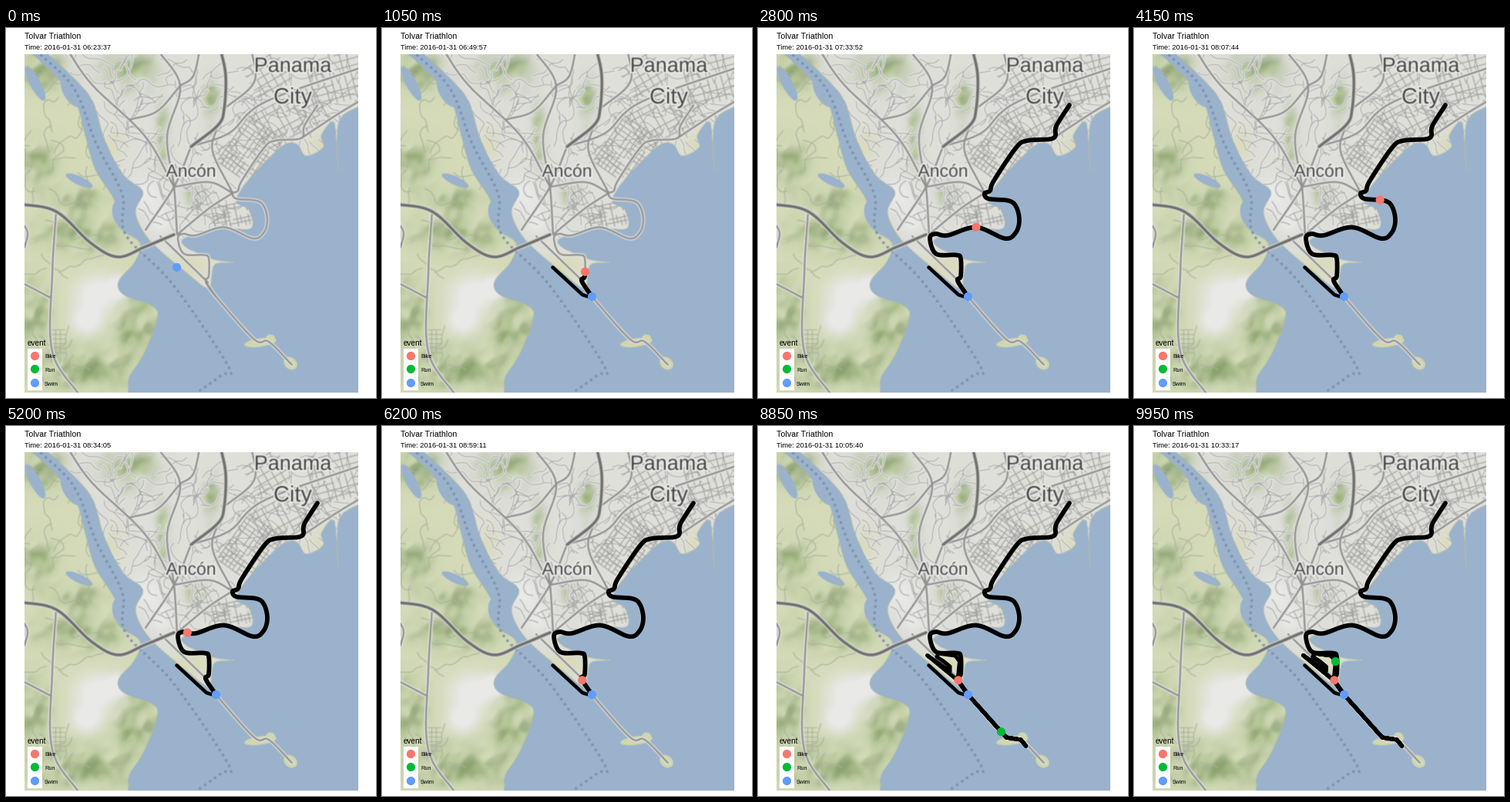
Recreate the animation shown at these times as a matplotlib script. Size 480x480 px, loop 10 s.

```python
import math
import random

import matplotlib.pyplot as plt
import numpy as np
from matplotlib.animation import FuncAnimation
from matplotlib.collections import LineCollection
from matplotlib.patches import Circle, Ellipse, Polygon, Rectangle
from matplotlib.patheffects import withStroke

SIZE, DPI = 480, 72
FRAMES, INTERVAL = 200, 50
LEFT, RIGHT, TOP, BOTTOM = 24, 457, 34, 473
START = 6 * 3600 + 23 * 60 + 37
DURATION = 14980
WATER = "#9ab2cc"
BIKE, RUN, SWIM = "#f8766d", "#00ba38", "#619cff"

random.seed(31)
rng = np.random.default_rng(31)
plt.rcParams["font.family"] = "Liberation Sans"

fig = plt.figure(figsize=(SIZE / DPI, SIZE / DPI), dpi=DPI, facecolor="white")
ax = fig.add_axes([0, 0, 1, 1])


def reset_axes():
    ax.clear()
    ax.set_xlim(0, SIZE)
    ax.set_ylim(SIZE, 0)
    ax.axis("off")


def smooth(pts, n=8):
    """Catmull-Rom curve through the points."""
    p = np.array(pts, float)
    p = np.vstack([2 * p[0] - p[1], p, 2 * p[-1] - p[-2]])
    t = np.linspace(0, 1, n, endpoint=False)[:, None]
    out = []
    for a, b, c, d in zip(p, p[1:], p[2:], p[3:]):
        out.append(0.5 * (2 * b + (c - a) * t + (2 * a - 5 * b + 4 * c - d) * t**2
                          + (3 * b - a - 3 * c + d) * t**3))
    return np.vstack(out + [p[-2:-1]])


class Route:
    def __init__(self, pts):
        self.pts = np.array(pts, float)
        steps = np.hypot(*np.diff(self.pts, axis=0).T)
        self.dist = np.concatenate([[0], np.cumsum(steps)])
        self.length = self.dist[-1]

    def at(self, s):
        return [np.interp(s, self.dist, self.pts[:, k]) for k in (0, 1)]

    def until(self, s):
        return np.vstack([self.pts[self.dist < s], self.at(s)])

    def near(self, x, y):
        return self.dist[np.argmin(np.hypot(*(self.pts - [x, y]).T))]


# ---- routes ----
swim = Route([(221.5, 310.5), (260, 346), (266, 348), (272.5, 348.5)])
bike = Route(smooth([
    (272, 348), (259, 328), (263, 322), (263, 299), (257, 294.5), (231, 293),
    (223, 273), (230, 267), (246, 269), (283, 258.5), (320, 273),
    (334, 266), (339, 250), (335, 232), (325, 224), (299, 221.5), (294, 214.5), (301, 211),
    (306, 198), (335, 155), (350, 146), (383, 143), (387, 127), (404, 100)]))
SPUR = [(259, 330), (272, 348), (322, 404), (341, 407), (347.5, 415)]
NORTH = [(219.5, 297.5), (249, 318), (249, 312), (241, 305.5), (232, 299.5), (234, 295),
         (256, 298), (261.5, 305.5)]
LAP = SPUR + SPUR[-2::-1] + NORTH
run = Route(LAP + LAP)
RUN_MID = Route(LAP[:-4]).length

# ---- map ----
WEST = [(16, 26), (36, 36), (71, 70), (92, 100), (103, 140), (116, 184), (141, 224),
        (146, 258), (174, 279), (166, 305), (146, 328), (152, 346), (192, 362),
        (195, 382), (178, 424), (160, 452), (144, 485), (16, 485)]
EAST = [(46, 26), (88, 65), (113, 96), (127, 142), (152, 190), (178, 212),
        (168, 240), (187, 276), (234, 317), (262, 338), (267, 320), (272, 306),
        (297, 304), (268, 300), (231, 282), (235, 271), (283, 260),
        (318, 260), (315, 236), (299, 226), (306, 208), (330, 180), (360, 152), (378, 151),
        (389, 166), (411, 155), (409, 139), (426, 123), (431, 184), (432, 120), (470, 90),
        (470, 26)]
# centre, size, angle
ISLANDS = [(330, 408, 42, 11, -8), (343, 404, 13, 13, 0), (369, 435, 19, 15, 40)]
PONDS = [(38, 72, 50, 14, 62), (85, 84, 42, 20, 58), (95, 198, 38, 11, 25),
         (148, 240, 20, 34, -10), (241, 281, 24, 14, 25)]
MOTORWAYS = [
    [(16, 228), (65, 238), (110, 279), (145, 297), (180, 284), (218, 268)],
    [(278, 26), (285, 62), (283, 105), (275, 126), (240, 154)],
]
ROADS = [
    [(78, 26), (112, 74), (180, 140), (218, 206)],
    [(195, 26), (226, 75), (209, 140), (218, 206), (222, 268)],
    [(240, 154), (218, 206), (181, 262)],
    [(226, 75), (243, 62), (252, 26)],
    [(226, 75), (196, 108), (160, 119)],
    [(240, 154), (290, 136), (336, 96), (470, 48)],
    [(283, 105), (322, 70), (318, 26)],
    [(275, 126), (268, 160), (294, 214)],
    [(218, 206), (264, 200), (294, 214)],
    [(222, 268), (262, 235), (294, 214)],
    [(383, 143), (430, 112), (470, 88)],
    [(65, 238), (60, 320), (60, 420), (98, 480)],
    [(16, 328), (58, 350)],
    [(20, 250), (28, 266), (24, 285)],
    [(200, 270), (262, 330)],
]
FERRY = [(40, 30), (88, 78), (117, 150), (151, 216), (155, 268), (216, 332), (288, 438),
         (280, 450), (246, 474)]
# centre, spread
GREENS = [(48, 55, 30, 22), (36, 178, 26, 26), (95, 224, 28, 14), (95, 268, 50, 20),
          (172, 385, 26, 38), (105, 442, 55, 26), (34, 370, 20, 38), (160, 55, 30, 24),
          (204, 140, 8, 36), (266, 92, 10, 26), (247, 218, 11, 15)]
WHITES = [(118, 345, 30, 24), (105, 380, 20, 18), (148, 335, 14, 13), (180, 216, 24, 18),
          (200, 248, 14, 16)]
SANDS = [(140, 150, 14, 24), (238, 310, 32, 18), (412, 152, 22, 20)]


def blobs(items, x, y):
    return sum(np.exp(-((x - cx) / sx)**2 - ((y - cy) / sy)**2)
               for cx, cy, sx, sy in items)


def terrain(x, y):
    out = np.zeros_like(x)
    for _ in range(40):
        wave, a, phase = rng.uniform(14, 60), rng.uniform(0, math.pi), rng.uniform(0, 6.28)
        out += wave * np.sin((x * math.cos(a) + y * math.sin(a)) * 6.283 / wave + phase)
    return out / 150


def tint(color, alpha, clip):
    rgba = np.empty(alpha.shape + (4,))
    rgba[..., :3] = np.array(color) / 255
    rgba[..., 3] = np.clip(alpha, 0, 1)
    img = ax.imshow(rgba, extent=(LEFT, RIGHT, BOTTOM, TOP), aspect="auto", zorder=2)
    img.set_clip_path(clip)


def strokes(lines, color, width, clip, z, casing=None):
    if casing:
        strokes(lines, casing, width + 2.2, clip, z - .1)
    group = ax.add_collection(LineCollection(lines, colors=color, linewidths=width, zorder=z,
                                             capstyle="round"))
    group.set_clip_path(clip)


def wander(x0, y0, x1, y1, count):
    """Random winding lanes that start inside a box."""
    lines = []
    for _ in range(count):
        x, y = random.uniform(x0, x1), random.uniform(y0, y1)
        a, pts = random.uniform(0, 6.28), []
        for _ in range(random.randint(4, 9)):
            pts.append((x, y))
            a += random.gauss(0, .5)
            x, y = x + 8 * math.cos(a), y + 8 * math.sin(a)
        lines.append(smooth(pts, 4))
    return lines


def blocks(cx, cy, w, h, angle, step):
    """Broken street grid, turned by the angle in degrees."""
    c, s = math.cos(math.radians(angle)), math.sin(math.radians(angle))
    lines = []
    for flip, (long, short) in enumerate([(w, h), (h, w)]):
        for v in np.arange(-short / 2, short / 2, step):
            u = -long / 2
            while u < long / 2:
                end = min(u + random.uniform(2, 6) * step, long / 2)
                ends = [(v, u), (v, end)] if flip else [(u, v), (end, v)]
                if random.random() < .8:
                    lines.append([(cx + p * c - q * s, cy + p * s + q * c) for p, q in ends])
                u = end + step * random.choice([0, 0, 1])
    return lines


def label(x, y, text, size):
    ax.text(x, y, text, size=size, color="#444444", ha="center", va="baseline", zorder=9,
            path_effects=[withStroke(linewidth=3.5, foreground="#efefee")])


def oval(x, y, w, h, angle, color, z):
    ax.add_patch(Ellipse((x, y), w, h, angle=angle, fc=color, ec="none", zorder=z))


def draw_map():
    panel = ax.add_patch(Rectangle((LEFT, TOP), RIGHT - LEFT, BOTTOM - TOP, fc=WATER,
                                   ec="none", zorder=0))
    west, east = [ax.add_patch(Polygon(smooth(p, 5), fc=color, ec="#b4bf9f", lw=.7, zorder=1))
                  for p, color in ((WEST, "#d5dbb9"), (EAST, "#dfdfda"))]
    for isle in ISLANDS:
        oval(*isle, "#d0d6ae", 1)
    for pond in PONDS:
        oval(*pond, WATER, 2.5)

    x, y = np.meshgrid(np.arange(LEFT, RIGHT) + .5, np.arange(TOP, BOTTOM) + .5)
    height = terrain(x, y)
    gy, gx = np.gradient(height)
    shade = (gx + gy) * 1.2
    green = np.clip(blobs(GREENS, x, y), 0, 1)
    for clip in (west, east):
        tint((217, 218, 176), blobs(SANDS, x, y) * .8, clip)
        tint((164, 185, 134), green * (.85 + .25 * height), clip)
        tint((95, 120, 75), green * np.clip(shade, 0, .35), clip)
        tint((232, 236, 212), green * np.clip(-shade, 0, .35), clip)
        tint((233, 233, 232), blobs(WHITES, x, y) * 1.3, clip)

    minor = (wander(120, 40, 290, 200, 75) + wander(290, 40, 455, 150, 65)
             + wander(195, 200, 290, 260, 30))
    strokes(minor, "#a6a6a4", 1.1, east, 3, "#e8e8e6")
    grid = (blocks(318, 158, 75, 55, -55, 6) + blocks(370, 118, 90, 55, -28, 8)
            + blocks(430, 66, 70, 60, -15, 9) + blocks(340, 62, 50, 45, -30, 10)
            + blocks(293, 244, 48, 30, -12, 5))
    strokes(grid, "#a2a2a1", 1.2, east, 3.2)
    strokes(wander(30, 60, 130, 290, 30) + wander(30, 300, 110, 460, 9)
            + blocks(67, 412, 18, 42, 0, 6), "#adb1a1", 1.1, west, 3)

    causeway = smooth(SPUR[:4] + [(371, 437)])
    strokes([smooth(p) for p in ROADS] + [bike.pts, causeway], "#919191", 2.5, panel, 4,
            "#ececea")
    strokes([smooth(p) for p in MOTORWAYS], "#707070", 3.8, panel, 5, "#e4e4e0")
    ax.plot(*smooth(FERRY).T, color="#7890aa", lw=3.6, ls=(0, (.01, 2.2)),
            dash_capstyle="round", zorder=3.5)
    label(372, 57, "Panama", 27)
    label(372, 98, "City", 29)
    label(240, 193, "Ancón", 23)


def bake():
    """Render the map once, slightly softened like scaled tiles."""
    fig.canvas.draw()
    img = np.asarray(fig.canvas.buffer_rgba())[..., :3] / 255
    part = img[TOP:BOTTOM, LEFT:RIGHT]
    for _ in range(2):
        p = np.pad(part, [(1, 1), (0, 0), (0, 0)], mode="edge")
        part = (.2 * p[:-2] + .6 * p[1:-1] + .2 * p[2:]).swapaxes(0, 1)
    reset_axes()
    ax.imshow(part, extent=(LEFT, RIGHT, BOTTOM, TOP), aspect="auto",
              interpolation="nearest", zorder=0)


reset_axes()
draw_map()
bake()


def disc(x, y, color, z):
    return ax.add_patch(Circle((x, y), 5.6, fc=color, ec="none", zorder=z))


# ---- titles and legend ----
ax.text(24, 13.5, "Tolvar Triathlon", size=10.6, va="baseline")
clock = ax.text(24, 27.5, "", size=9.2, va="baseline")
ax.text(28, 412, "event", size=10, va="baseline")
ax.add_patch(Rectangle((28, 416), 18.5, 53.5, fc="white", ec="none", zorder=5))
for cy, name, color in [(425.5, "Bike", BIKE), (442.5, "Run", RUN), (460.5, "Swim", SWIM)]:
    disc(37.5, cy, color, 6)
    ax.text(50, cy + 3, name, size=7.4, va="baseline", zorder=6)

# ---- motion ----
HOME, TURN = bike.near(259, 330), bike.length
RIDE = [(20, 0), (33, TURN), (40, bike.near(328, 226)), (49.5, HOME),
        (56, bike.near(281, 259)), (64.6, TURN), (76, HOME), (83, bike.near(319, 223)),
        (88.4, TURN), (101, HOME), (112, bike.near(350, 146)), (123, HOME)]


def trail(width):
    return ax.plot([], [], color="black", lw=width, zorder=10, solid_capstyle="round",
                   solid_joinstyle="round")[0]


parts = {
    "swim": (swim, trail(4.6), disc(0, 0, SWIM, 13)),
    "bike": (bike, trail(5.8), disc(0, 0, BIKE, 12)),
    "run": (run, trail(5), disc(0, 0, RUN, 14)),
}


def place(name, now, reach, shown):
    route, line, dot = parts[name]
    line.set_visible(bool(shown and reach > 0))
    dot.set_visible(shown)
    line.set_data(*route.until(reach).T)
    dot.center = route.at(now)


def update(i):
    t = START + int(i * DURATION / (FRAMES - 1))
    clock.set_text(f"Time: 2016-01-31 {t // 3600:02d}:{t // 60 % 60:02d}:{t % 60:02d}")
    s = swim.length * min(i / 18, 1)
    place("swim", s, s, True)
    s = np.interp(i, *zip(*RIDE))
    place("bike", s, s if i < 33 else TURN, i >= 20)
    s = np.interp(i, [125, 155, 199], [0, RUN_MID, run.length])
    place("run", s, s, i >= 125)
    return []


anim = FuncAnimation(fig, update, frames=FRAMES, interval=INTERVAL, repeat=True,
                     repeat_delay=0, blit=False)
plt.show()
```
